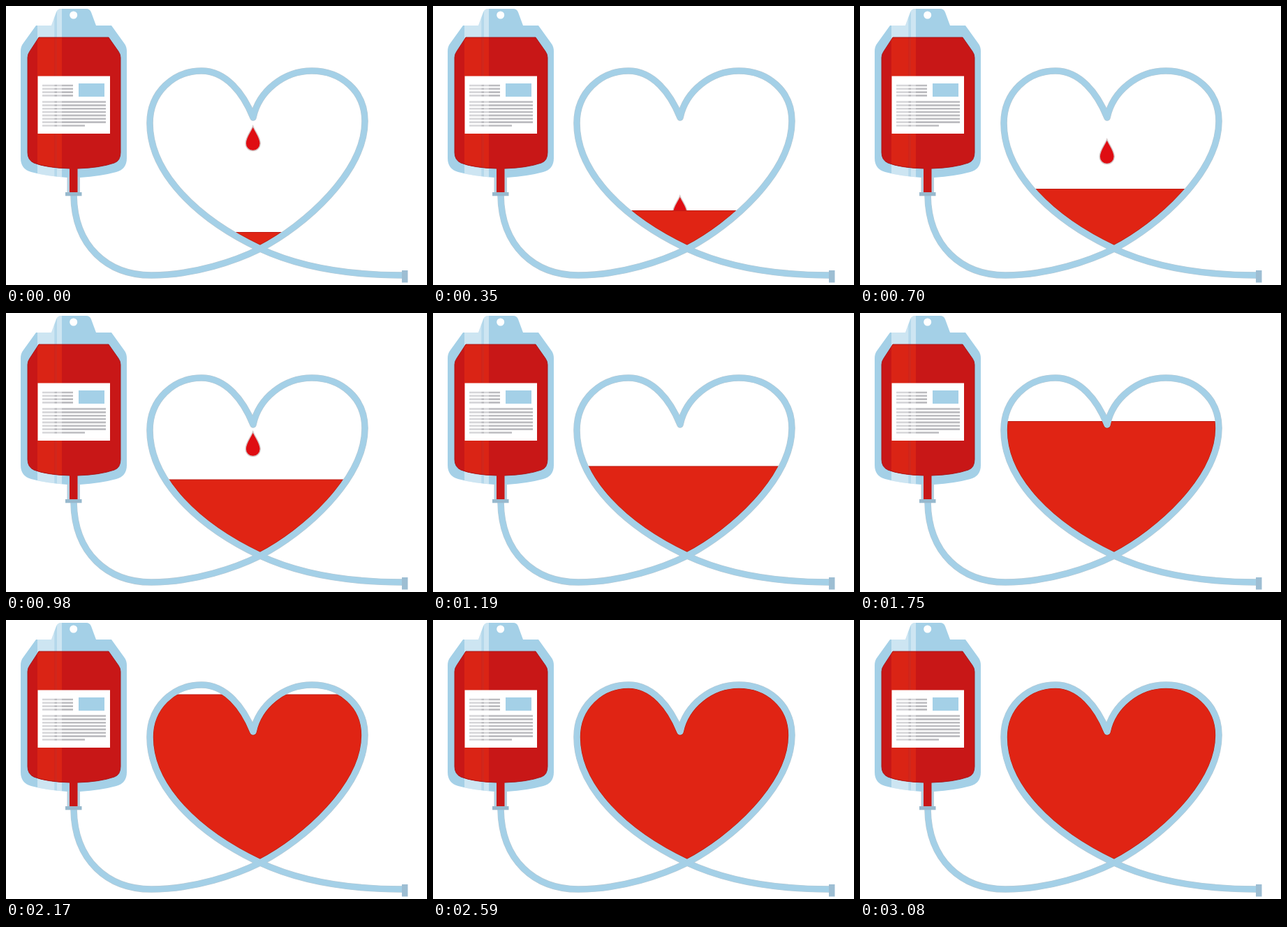
Write an HTML page that moves like this. It is 603 px wide and 400 px high and loops after 3150 ms.

```html
<!DOCTYPE html>
<html lang="en">
<head>
<meta charset="utf-8">
<title>Blood donation</title>
<style>
  html, body { margin: 0; width: 100%; height: 100%; overflow: hidden; background: #fff; }
  svg { display: block; width: 603px; height: 400px; }
</style>
</head>
<body>
<svg viewBox="0 0 603 400">
  <defs>
    <path id="bag" d="M79 4H115Q120 4 122 9L129 28H151L169 53Q173 58 173 65V218Q173 234 158 238Q136 244 106 246H88Q58 244 36 238Q21 234 21 218V65Q21 58 25 53L43 28H65L72 9Q74 4 79 4Z"/>
    <path id="blood" d="M47 45H147L161 65Q164 69 164 74V210Q164 222 155 225Q135 232 103 233H91Q58 232 40 225Q31 221 31 210V74Q31 69 34 65Z"/>
    <path id="heart" d="M364 348C428 315 514 238 514 165C514 122 480 93 438 93C398 93 362 122 354 160C340 125 315 93 280 93C240 93 206 124 206 168C206 240 275 306 364 348Z"/>
    <path id="tube" d="M97 271C98 345 146 386 208 386C270 386 330 365 364 348C428 315 514 238 514 165C514 122 480 93 438 93C398 93 362 122 354 160C340 125 315 93 280 93C240 93 206 124 206 168C206 240 275 306 364 348C420 374 490 386 568 386"/>
    <path id="shine" d="M45 0H69.5V250H45ZM73 0H80V250H73Z"/>
    <clipPath id="inBag"><use href="#bag"/></clipPath>
    <clipPath id="inBlood"><use href="#blood"/></clipPath>
    <clipPath id="inHeart"><use href="#heart"/></clipPath>
    <clipPath id="belowLevel"><rect id="levelClip" x="190" width="340" height="400"/></clipPath>
  </defs>

  <path id="drop" d="M0 0C3 8 10.5 16 10.5 25A10.5 10.5 0 0 1 -10.5 25C-10.5 16 -3 8 0 0Z" fill="#df0d12" stroke="#d3c3c3" stroke-width="1.4"/>
  <g clip-path="url(#inHeart)">
    <rect id="liquid" x="190" width="340" height="400" fill="#e02414" stroke="#bd1b14"/>
    <use href="#heart" clip-path="url(#belowLevel)" fill="none" stroke="#a8190f" stroke-width="10.6" stroke-linejoin="round"/>
  </g>

  <g fill="none" stroke-linejoin="round">
    <use href="#tube" stroke="#b7c9d4" stroke-width="9.6"/>
    <use href="#tube" stroke="#a4d0e7" stroke-width="8.4"/>
  </g>
  <rect x="567" y="379" width="8.5" height="17.5" fill="#9dbed3"/>

  <use href="#bag" fill="#a4d0e7"/>
  <g clip-path="url(#inBag)" fill="#fff" opacity=".45">
    <use href="#shine"/>
    <rect x="69.5" width="3.5" height="250" opacity=".4"/>
  </g>
  <circle cx="96.7" cy="13" r="5.5" fill="#fff"/>
  <use href="#blood" fill="#c81717"/>
  <use href="#shine" clip-path="url(#inBlood)" fill="#da2415"/>
  <rect x="69.5" y="45" width="3.5" height="187" fill="#d0271c"/>
  <use href="#blood" fill="none" stroke="#a51518" stroke-width=".9"/>
  <rect x="87.5" y="245" width="18.5" height="23" fill="#b4cfdf"/>
  <rect x="91" y="232" width="11.5" height="35" fill="#c81717"/>
  <rect x="85" y="267" width="23.5" height="5.3" fill="#97b9ce"/>

  <rect x="45.5" y="100.5" width="103.5" height="82.5" fill="#fff"/>
  <rect x="104" y="111" width="37" height="19" fill="#a4d0e7"/>
  <path id="lines" fill="none" stroke="#bcbcc0" stroke-width="2.6"/>
  <g fill="#fff" opacity=".4">
    <rect x="46" y="101" width="23.5" height="82"/>
    <rect x="73" y="101" width="7" height="82"/>
  </g>
</svg>
<script>
  const $ = id => document.getElementById(id);
  const STEP = 70, STEPS = 45;
  const LEVELS = [[0, 324.5], [10, 262.5], [14, 239], [21, 194.5], [25, 155.5], [31, 107], [33, 90]];
  const DROPS = [[0, 172], [9, 171], [14, 170]];
  const FALL = 20;

  const row = (y, right) => `M52 ${y}H${right}`;
  const rows = (count, y, gap, right) =>
    Array.from({ length: count }, (_, i) => row(y + i * gap, right)).join('');
  $('lines').setAttribute('d', rows(4, 114, 4.8, 96) + rows(7, 137.5, 4.85, 143) + row(171.5, 113));

  function levelAt(step) {
    const next = LEVELS.findIndex(([s]) => s > step);
    if (next < 0) return LEVELS[LEVELS.length - 1][1];
    const [s0, y0] = LEVELS[next - 1], [s1, y1] = LEVELS[next];
    return y0 + (y1 - y0) * (step - s0) / (s1 - s0);
  }

  function render(time) {
    const step = Math.floor(time / STEP) % STEPS;
    const level = levelAt(step);
    $('liquid').setAttribute('y', level);
    $('levelClip').setAttribute('y', level);

    const [start, top] = DROPS.filter(([s]) => s <= step).pop();
    const y = top + (step - start) * FALL;
    $('drop').setAttribute('transform', `translate(353.7 ${y})`);
    $('drop').setAttribute('visibility', y < level ? 'visible' : 'hidden');
  }

  const begin = performance.now();
  function tick() {
    render(performance.now() - begin);
    requestAnimationFrame(tick);
  }
  tick();
</script>
</body>
</html>
```
